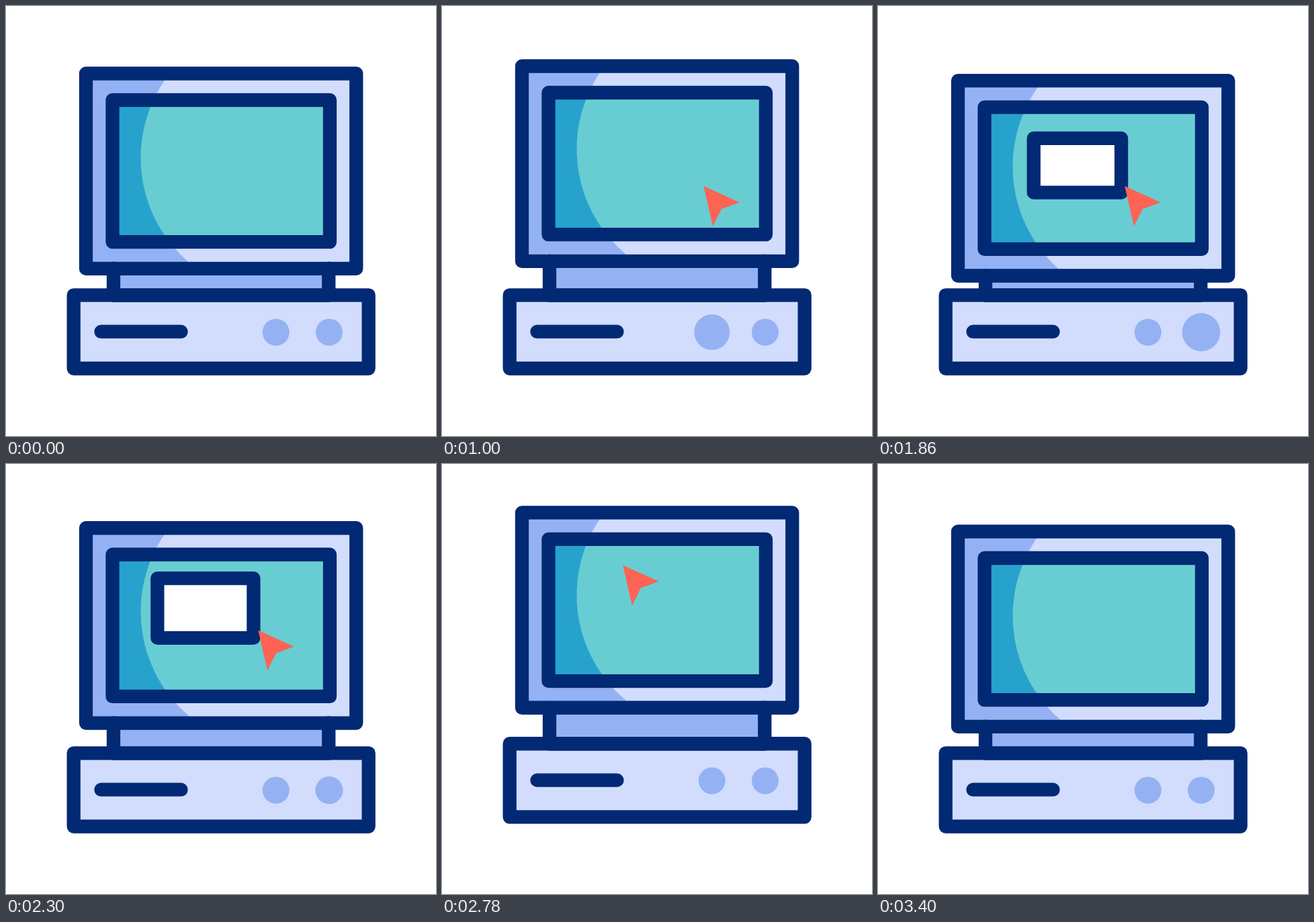
Recreate the animation shown at these times as an HTML page. Size 640 px wide and 640 px high, loop 3.6 s.

```html
<!DOCTYPE html>
<html lang="en">
<head>
<meta charset="utf-8">
<title>Desktop computer</title>
<style>
  html, body { margin: 0; width: 100%; height: 100%; overflow: hidden; background: #fff; }
  svg { display: block; width: 100vw; height: 100vh; }
  .line { fill: none; stroke: #022974; stroke-width: 20.3; stroke-linejoin: round; stroke-linecap: round; }
  .light { fill: #d2dcfd; }
  .mid { fill: #94b2f3; }
</style>
</head>
<body>
<svg viewBox="0 0 640 640">
  <defs>
    <clipPath id="caseClip"><rect x="119" y="100.5" width="402.3" height="290.3"/></clipPath>
    <clipPath id="screenClip"><rect x="158.5" y="140" width="323.5" height="211.2"/></clipPath>
  </defs>
  <g id="computer">
    <rect class="mid" x="160" y="340" width="320" height="90"/>
    <rect class="light" x="100.7" y="430.3" width="439" height="109.2"/>
    <circle id="button1" class="mid" cx="401.8" cy="485.5"/>
    <circle id="button2" class="mid" cx="481" cy="485.5"/>
    <path class="line" d="M100.7 430.3H539.7V539.5H100.7ZM141.5 484.7H260.5"/>
    <g id="monitor">
      <g clip-path="url(#caseClip)">
        <rect class="mid" x="119" y="100" width="403" height="292"/>
        <circle id="glow1" class="light" cx="404.7" r="204.2"/>
        <rect class="light" x="404" y="100" width="118" height="292"/>
      </g>
      <g clip-path="url(#screenClip)">
        <rect fill="#27a2cd" x="158" y="139" width="325" height="213"/>
        <circle id="glow2" fill="#68cdd2" cx="404.7" r="204.2"/>
        <g id="win">
          <rect id="pane" class="line" style="fill:#fff"/>
        </g>
        <path id="cursor" fill="#ff6353" d="M0 0L53.3 24.2L26.5 34.2L13.7 60Z"/>
      </g>
      <path class="line" d="M119 100.5H521.3V390.8H119ZM158.5 140H482V351.2H158.5Z"/>
    </g>
    <path id="neck" class="line"/>
  </g>
</svg>
<script>
const LOOP = 3600;
const BEAT = 600;
const GROW = 2 * BEAT, SHRINK = 3 * BEAT, LEAVE = 4 * BEAT;
const JUMP = 2600, TOP = 3000, LAND = 3400;

const el = id => document.getElementById(id);
const set = (id, attrs) => {
  for (const key in attrs) el(id).setAttribute(key, attrs[key]);
};
const move = (id, x, y, more = "") => set(id, { transform: `translate(${x} ${y})${more}` });

// Sine ease from 0 to 1 between two times.
function ramp(t, from, to) {
  const p = Math.min(1, Math.max(0, (t - from) / (to - from)));
  return (1 - Math.cos(Math.PI * p)) / 2;
}

// Swell to 1 at the peak, one beat up and one beat down.
const swell = (t, peak) => ramp(t, peak - BEAT, peak) - ramp(t, peak, peak + BEAT);

function draw(t) {
  const jump = -33 * (ramp(t, JUMP, TOP) - ramp(t, TOP, LAND));
  const bob = 14 * (ramp(t, TOP, LAND) - ramp(t, 460, 1240))
    + 25 * (ramp(t, GROW, SHRINK) - ramp(t, SHRINK, 2640));
  move("computer", 0, jump);
  move("monitor", 0, bob);
  set("neck", { d: `M160 ${390.6 + bob}V430.7H480.3V${390.6 + bob}` });

  // The highlight drifts slightly further than the case.
  const cy = 226 + bob * 0.2;
  set("glow1", { cy });
  set("glow2", { cy });

  const enter = ramp(t, 450, 1220);
  const squeeze = ramp(t, GROW, SHRINK);
  const widen = ramp(t, SHRINK, LEAVE);
  const leave = ramp(t, LEAVE, 3220);
  move("cursor",
    461 - 88 * enter - 6 * squeeze + 9 * widen - 240 * leave,
    342 - 77.5 * enter - 7 * squeeze - 5 * widen - 166 * leave);

  const width = 144 - 14 * swell(t, SHRINK);
  const height = width * 0.62;
  const scale = ramp(t, 1000, GROW) - ramp(t, LEAVE, JUMP);
  set("pane", { x: -width / 2, y: -height / 2, width, height });
  set("win", { visibility: scale > 0 ? "visible" : "hidden" });
  move("win", 296.9, 226.8 - 7.6 * widen, ` scale(${scale})`);

  set("button1", { r: 20 + 8.6 * swell(t, GROW) });
  set("button2", { r: 20 + 8.6 * swell(t, SHRINK) });
}

const start = performance.now();
function tick() {
  draw((performance.now() - start) % LOOP);
  requestAnimationFrame(tick);
}
draw(0);
requestAnimationFrame(tick);
</script>
</body>
</html>
```
